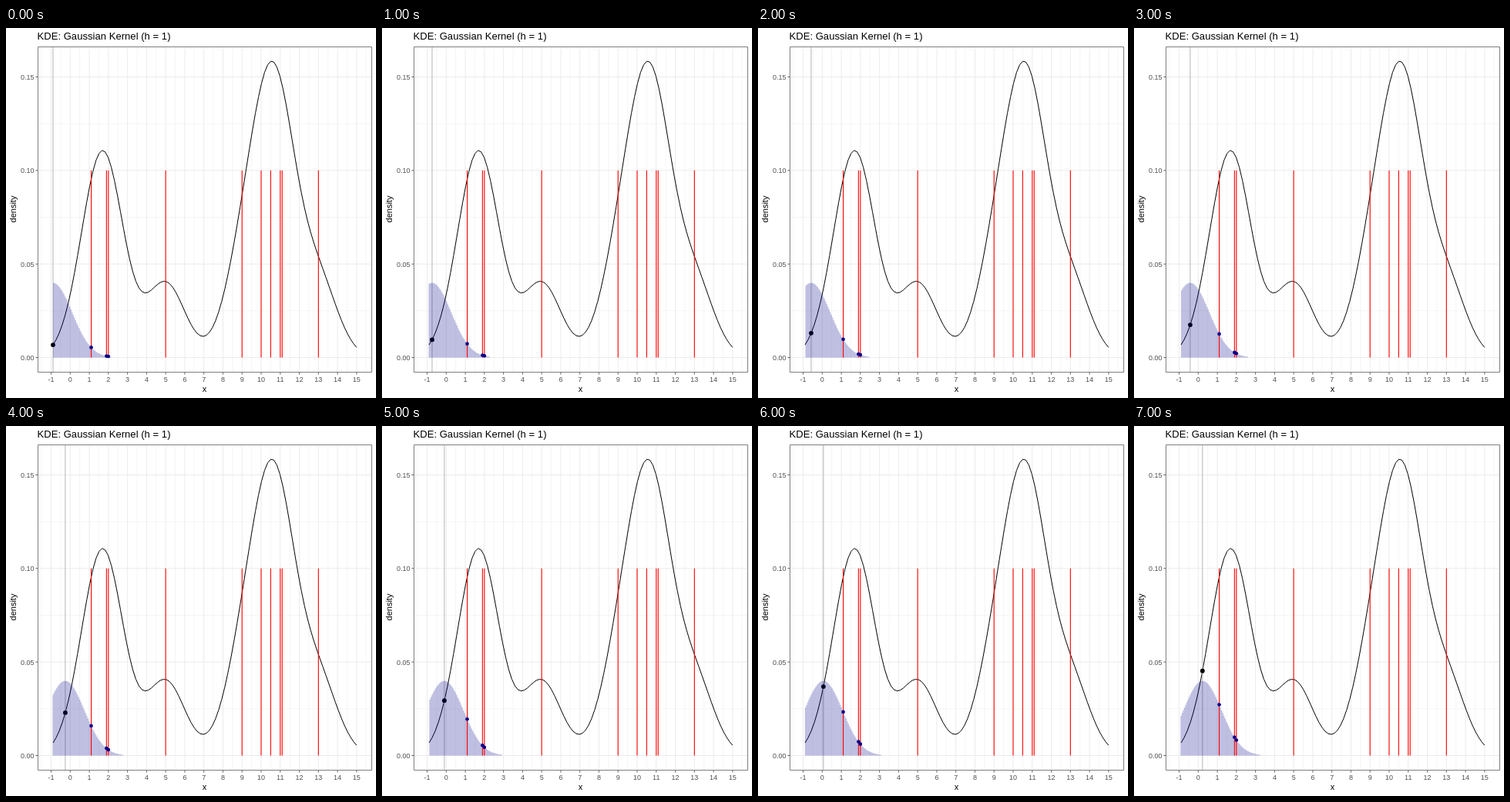
Animation of 480 by 480 pixels, one loop 8 s. Source, as an HTML page with a canvas:

```html
<!DOCTYPE html>
<html lang="en">
<head>
<meta charset="utf-8">
<title>Kernel density estimate</title>
<style>
  html, body { margin: 0; width: 100%; height: 100%; overflow: hidden; background: #fff; }
  canvas { display: block; }
</style>
</head>
<body>
<canvas id="stage" width="480" height="480"></canvas>
<script>
const ctx = document.getElementById('stage').getContext('2d');
const data = [1.1, 1.9, 2, 5, 9, 10, 10.5, 11, 11.1, 13];
const box = { left: 41.5, top: 24.5, right: 474.5, bottom: 446.5 };
const start = -0.9, step = 15.9 / 99, barWidth = 6 / 99;

const X = v => 83.3 + v * 24.77;
const Y = v => 427.5 - v * 2427;
const kernel = d => Math.exp(-d * d / 2) / Math.sqrt(2 * Math.PI) / data.length;
const density = x => data.reduce((sum, d) => sum + kernel(x - d), 0);

function line(x1, y1, x2, y2, color, width) {
  ctx.strokeStyle = color;
  ctx.lineWidth = width;
  ctx.beginPath();
  ctx.moveTo(x1, y1);
  ctx.lineTo(x2, y2);
  ctx.stroke();
}

function dot(x, y, r, color) {
  ctx.fillStyle = color;
  ctx.beginPath();
  ctx.arc(X(x), Y(y), r, 0, 2 * Math.PI);
  ctx.fill();
}

function text(str, x, y, size, align, color = '#000') {
  ctx.font = `${size}px "Liberation Sans", Arial, sans-serif`;
  ctx.textAlign = align;
  ctx.fillStyle = color;
  ctx.fillText(str, x, y);
}

function drawAxes() {
  const { left, top, right, bottom } = box;
  const gridX = (v, w) => line(X(v), top, X(v), bottom, '#ebebeb', w);
  const gridY = (v, w) => line(left, Y(v), right, Y(v), '#ebebeb', w);
  for (let v = -1.5; v < 16; v++) gridX(v, 0.5);
  for (let i = 0; i < 3; i++) gridY(0.025 + i * 0.05, 0.5);
  for (let v = -1; v <= 15; v++) {
    gridX(v, 1);
    line(X(v), bottom, X(v), bottom + 3, '#333', 0.8);
    text(v, X(v), 459, 9, 'center', '#4d4d4d');
  }
  for (let i = 0; i < 4; i++) {
    const v = i * 0.05;
    gridY(v, 1);
    line(left - 3, Y(v), left, Y(v), '#333', 0.8);
    text(v.toFixed(2), 36.5, Y(v) + 3.5, 9, 'right', '#4d4d4d');
  }
  ctx.letterSpacing = '0.05px';
  text('KDE: Gaussian Kernel (h = 1)', 40.5, 15, 13, 'left');
  ctx.letterSpacing = '0px';
  text('x', 257.5, 472, 11, 'center');
  ctx.save();
  ctx.translate(13, 235);
  ctx.rotate(-Math.PI / 2);
  text('density', 0, 0, 11, 'center');
  ctx.restore();
}

function drawCurve() {
  ctx.strokeStyle = '#000';
  ctx.lineWidth = 1;
  ctx.lineJoin = 'round';
  ctx.beginPath();
  for (let i = 0; i < 100; i++) {
    const x = start + i * step;
    ctx.lineTo(X(x), Y(density(x)));
  }
  ctx.stroke();
}

// Narrow bars under the kernel, cut off at the left end of the curve
function drawKernel(center) {
  ctx.fillStyle = 'rgba(0, 0, 139, 0.25)';
  ctx.beginPath();
  for (let i = 0; i < 100; i++) {
    const offset = -3 + i * barWidth;
    if (center + offset < start) continue;
    const x = X(center + offset - barWidth / 2);
    ctx.rect(x, Y(kernel(offset)), X(barWidth) - X(0), Y(0) - Y(kernel(offset)));
  }
  ctx.fill();
}

function draw(now) {
  const center = start + Math.floor(now % 8000 / 1000) * step;
  ctx.fillStyle = '#fff';
  ctx.fillRect(0, 0, 480, 480);
  drawAxes();
  drawCurve();
  line(X(center), box.top, X(center), box.bottom, '#b4b4b4', 1);
  dot(center, density(center), 2.9, '#000');
  drawKernel(center);
  for (const d of data) line(X(d), Y(0), X(d), Y(0.1), '#f00', 1.1);
  for (const d of data) {
    if (Math.abs(d - center) <= 3) dot(d, kernel(d - center), 2.3, '#00008b');
  }
  ctx.strokeStyle = '#7f7f7f';
  ctx.lineWidth = 1;
  ctx.strokeRect(box.left, box.top, box.right - box.left, box.bottom - box.top);
}

const origin = performance.now();
function tick() {
  draw(performance.now() - origin);
  requestAnimationFrame(tick);
}
tick();
</script>
</body>
</html>
```
